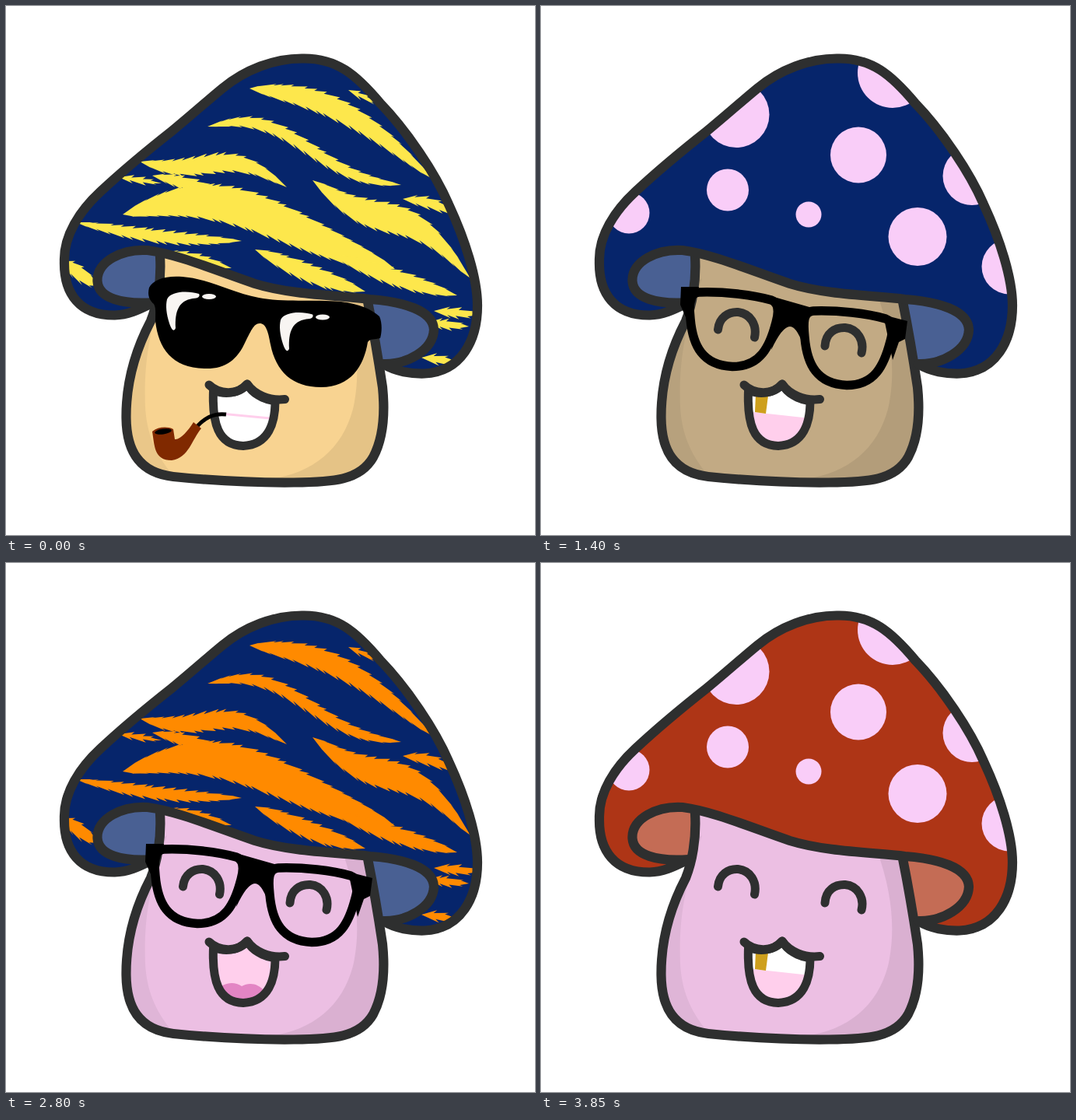
Write an HTML page that moves like this. It is 680x680 px and loops after 4200 ms.

```html
<!DOCTYPE html>
<html lang="en">
<head>
<meta charset="utf-8">
<title>Mushroom outfits</title>
<style>
  html, body { margin: 0; height: 100%; overflow: hidden; background: #fff; }
  svg { display: block; width: 100vw; height: 100vh; }
  .line { fill: none; stroke: #2e2f2f; stroke-width: 11; stroke-linecap: round; stroke-linejoin: round; }
  .outer { stroke-width: 12.2; }
  .skin { fill: var(--skin); }
  .cap { fill: var(--cap); }
  .gill { fill: color-mix(in srgb, var(--cap) 73%, white); }
  .mark { fill: var(--mark); }
  .part { display: none; }
  .part.on { display: inline; }
</style>
</head>
<body>
<svg viewBox="0 0 680 680">
  <defs>
    <path id="cap" d="M382 67.5C345 67 307 82 278 106C255 125 235 143 213 161C180 187 150 212 121 239C95 263 74 295 75 328C74 370 95 398 140 397.5C160 397 175 388 190 381C150 384 119 376 117.5 354C116 328 150 312 182 314C220 319 265 338 320 357C365 371 425 372 468 377C510 380 549 391 550 416C549 443 515 461 485 460C500 470 522 473 538 472.5C585 470 606 430 606 385C606 350 590 300 569 255C552 215 515 160 481 125C450 88 425 67 382 67.5Z"/>
    <path id="body" d="M198 322C200 355 194 385 186 405C165 445 154 485 154.5 530C155 570 170 600 215 605C265 610 320 613 370 612.5C420 612 455 610 472 580C488 550 486 510 484 490C478 450 470 405 465 380"/>
    <path id="lips" d="M266.5 495C265 535 272 565 305 565.5C338 564 346 535 346 508C330 506 316 497 310 486C298 499 281 500 266.5 494Z"/>
    <path id="lens" d="M203 368C235 367 272 371 296 378C306 382 306 393 302 407C294 438 282 463.5 246 463.5C208 462 195 437 192 402C190 382 190 369 203 368Z"/>
    <clipPath id="inCap"><use href="#cap"/></clipPath>
    <clipPath id="inBody"><use href="#body"/></clipPath>
    <clipPath id="inLips"><use href="#lips"/></clipPath>
  </defs>

  <ellipse class="gill" cx="175" cy="348" rx="58" ry="34"/>
  <ellipse class="gill" cx="480" cy="418" rx="68" ry="42"/>
  <use href="#body" class="skin"/>
  <g clip-path="url(#inBody)">
    <path fill-opacity=".055" d="M207 350C185 415 177 455 179 515C181 550 192 575 212 600V620H140V400Z"/>
    <path fill-opacity=".08" d="M432 370C452 425 456 475 446 518C432 570 395 600 340 608V630H500V370Z"/>
  </g>
  <use href="#body" class="line outer"/>
  <use href="#cap" class="cap"/>
  <g clip-path="url(#inCap)" class="mark">
    <g id="spots" class="part"></g>
    <g id="stripes" class="part"></g>
  </g>
  <use href="#cap" class="line outer"/>

  <g clip-path="url(#inLips)">
    <path id="mouth" d="M255 480H360V575H255Z"/>
    <path id="tongue" class="part" fill="#e385c4" d="M270 550C279 539 293 537 303 544C313 538 325 541 332 550V575H270Z"/>
    <g id="gold" class="part">
      <path fill="#ffcfec" d="M255 520L355 531V575H255Z"/>
      <path fill="#cea01d" d="M276 499L292 501 289 524 275 522Z"/>
    </g>
    <path id="gap" class="part" fill="#ffcfec" d="M271 522L345 529V532L271 525Z"/>
    <g id="braces" class="part" fill="#a9a0c6" stroke="#a9a0c6" stroke-width="1.5"></g>
  </g>
  <use href="#lips" class="line"/>
  <path class="line" d="M261 487C273 499 298 501 310 486C319 499 338 508 358.5 505.5"/>
  <g id="pipe" class="part">
    <path fill="none" stroke="#000" stroke-width="5" d="M283 525C266 523 255 530 244 542"/>
    <path fill="#802900" d="M188 547C195 541 207 540 215 544L217 557C224 558 234 546 241 535L251 543C239 557 235 581 213 584C190 584 191 565 188 547Z"/>
    <ellipse cx="202" cy="547" rx="11" ry="3.5" transform="rotate(-8 202 547)"/>
  </g>

  <path id="eyes" class="part line" d="M227.5 416C229 400 241 393 253 393.5C269 395 278 410 274.5 426M365 437C366 420 378 413 391 413.5C407 415 416 430 412 446"/>
  <g id="glasses" class="part">
    <g fill="none" stroke="#000" stroke-width="11.5">
      <use href="#lens"/>
      <use href="#lens" x="147" y="24"/>
    </g>
    <path d="M296 373L345 387 340 445Q330 412 320 412T296 442L304 390ZM180 361H203L192 402 186 400 179 384ZM440 397L471 405 468 428 460 432 452 455Z"/>
  </g>
  <g id="shades" class="part">
    <path d="M184 362C190 350 210 345 235 349C265 353 290 368 325 375C355 381 395 377 430 380C455 383 470 390 480 399C484 408 483 420 481 427C474 429 468 427 465 432C460 463 443 490 405 490C368 490 347 470 340 435C337 418 334 408 326 408C318 408 314 420 308 431C297 456 281 467 255 466C213 465 196 440 192 405C192 395 193 388 190 383C183 377 182 370 184 362Z"/>
    <g id="glint" fill="#f8f5f2">
      <path d="M207 377C212 366 235 366 248 370C250 373 247 376 240 376C222 379 217 392 218 414C216 419 213 417 210 408C206 396 205 385 207 377Z"/>
      <ellipse cx="261" cy="373.5" rx="9" ry="3.5"/>
    </g>
    <use href="#glint" x="146" y="26.5"/>
  </g>
  <g id="monocle" class="part" fill="#272a3b">
    <circle cx="387" cy="431.5" r="46" fill="none" stroke="#272a3b" stroke-width="9"/>
    <circle cx="441" cy="442" r="11.5"/>
    <circle class="skin" cx="441" cy="441.5" r="2"/>
  </g>
</svg>
<script>
const $ = id => document.getElementById(id);

function add(parent, tag, attrs) {
  const el = document.createElementNS('http://www.w3.org/2000/svg', tag);
  for (const key in attrs) el.setAttribute(key, attrs[key]);
  $(parent).append(el);
}
const dot = (parent, cx, cy, r) => add(parent, 'circle', { cx, cy, r });

dot('spots', 251, 139.5, 42.5);
dot('spots', 452, 86, 45);
dot('spots', 408, 191.5, 36);
dot('spots', 240, 236.5, 27);
dot('spots', 113, 266, 26.5);
dot('spots', 344, 268, 16.5);
dot('spots', 484, 296.5, 37.5);
dot('spots', 554, 218.5, 37.5);
dot('spots', 602, 335, 35.5);

for (let i = 0; i < 10; i++) dot('monocle', 454 - i * 1.8, 445 + i * 9.7, 3.2);

// Braces: two wires with four brackets each
for (const [x, y, gap] of [[281, 513, 16], [284, 540, 13]]) {
  add('braces', 'path', { d: `M${x - 14} ${y - 2}l76 9` });
  for (let i = 0; i < 4; i++) dot('braces', x + i * gap, y + i * 1.6, 3.2);
}

let seed = 7;
const random = () => (seed = seed * 16807 % 2147483647) / 2147483647;

// A stripe tapers at both ends, follows a bent and swaying spine,
// and has teeth that lean towards its tail.
function stripe(x0, y0, x1, y1, width, bend = 0, sway = 0) {
  const count = Math.max(3, Math.round((x1 - x0) / 14));
  const edge = (t, side, push) => {
    const arc = Math.sin(Math.PI * t);
    const spine = y0 + (y1 - y0) * t + bend * arc + sway * Math.sin(2 * Math.PI * t);
    return [x0 + (x1 - x0) * t, spine + side * (width * arc ** .65 + push * arc)];
  };
  const outline = side => {
    const points = [edge(0, side, 0)];
    for (let i = 1; i < count; i++) {
      const t = (i + random() * .5 - .25) / count;
      points.push(edge(t + .3 / count, side, 2), edge(t, side, -2));
    }
    return points;
  };
  const points = [...outline(-1), [x1, y1], ...outline(1).reverse()];
  add('stripes', 'path', { d: `M${points.join('L')}Z` });
}

stripe(313, 106, 548, 222, 15, -29);
stripe(259, 155, 508, 230, 9, -13, -14);
stripe(172, 200, 361, 233, 12, -14, 9);
stripe(188, 218, 310, 262, 9, -6);
stripe(150, 268, 500, 338, 25, -36, -9);
stripe(420, 320, 580, 372, 11, 3);
stripe(394, 224, 597, 350, 19, -14, 13);
stripe(90, 278, 303, 302, 8, 6);
stripe(320, 313, 462, 367, 12, 4);
stripe(208, 316, 290, 337, 7);
stripe(70, 328, 120, 360, 11);
stripe(510, 248, 585, 270, 7, -5);
stripe(145, 220, 200, 228, 4);
stripe(440, 108, 480, 126, 4);
for (let i = 0; i < 3; i++) stripe(550 - i * 8, 392 + i * i * 15, 610 - i * 15, 397 + i * i * 15, 6);

const green = '#51a143', red = '#ae3516', blue = '#06256b';
const yellow = '#fde74c', orange = '#ff8a00', amber = '#ffb941', pink = '#f9cdf8', forest = '#0a420b';
const tan = '#f8d391', brown = '#c2aa84', rose = '#ecbfe3';

// cap, mark, skin, visible parts
const looks = [
  [blue, yellow, tan, 'stripes shades gap pipe'],
  [green, orange, brown, 'stripes eyes glasses gap braces'],
  [blue, amber, tan, 'spots shades tongue'],
  [red, yellow, rose, 'stripes eyes monocle tongue'],
  [blue, pink, brown, 'spots eyes glasses gold'],
  [green, forest, rose, 'spots eyes tongue'],
  [blue, yellow, brown, 'stripes eyes monocle gap'],
  [red, amber, tan, 'spots shades tongue'],
  [blue, orange, rose, 'stripes eyes glasses tongue'],
  [green, amber, tan, 'spots shades gold'],
  [blue, yellow, brown, 'stripes eyes tongue'],
  [red, pink, rose, 'spots eyes gold']
];

function wear([cap, mark, skin, parts]) {
  const style = document.documentElement.style;
  style.setProperty('--cap', cap);
  style.setProperty('--mark', mark);
  style.setProperty('--skin', skin);
  const names = parts.split(' ');
  document.querySelectorAll('.part').forEach(el => el.classList.toggle('on', names.includes(el.id)));
  $('mouth').setAttribute('fill', names.includes('tongue') ? '#ffcfec' : '#fff');
}

const start = performance.now();
let shown = -1;
function tick() {
  const index = Math.floor((performance.now() - start) / 350) % looks.length;
  if (index !== shown) wear(looks[shown = index]);
  requestAnimationFrame(tick);
}
tick();
</script>
</body>
</html>
```
